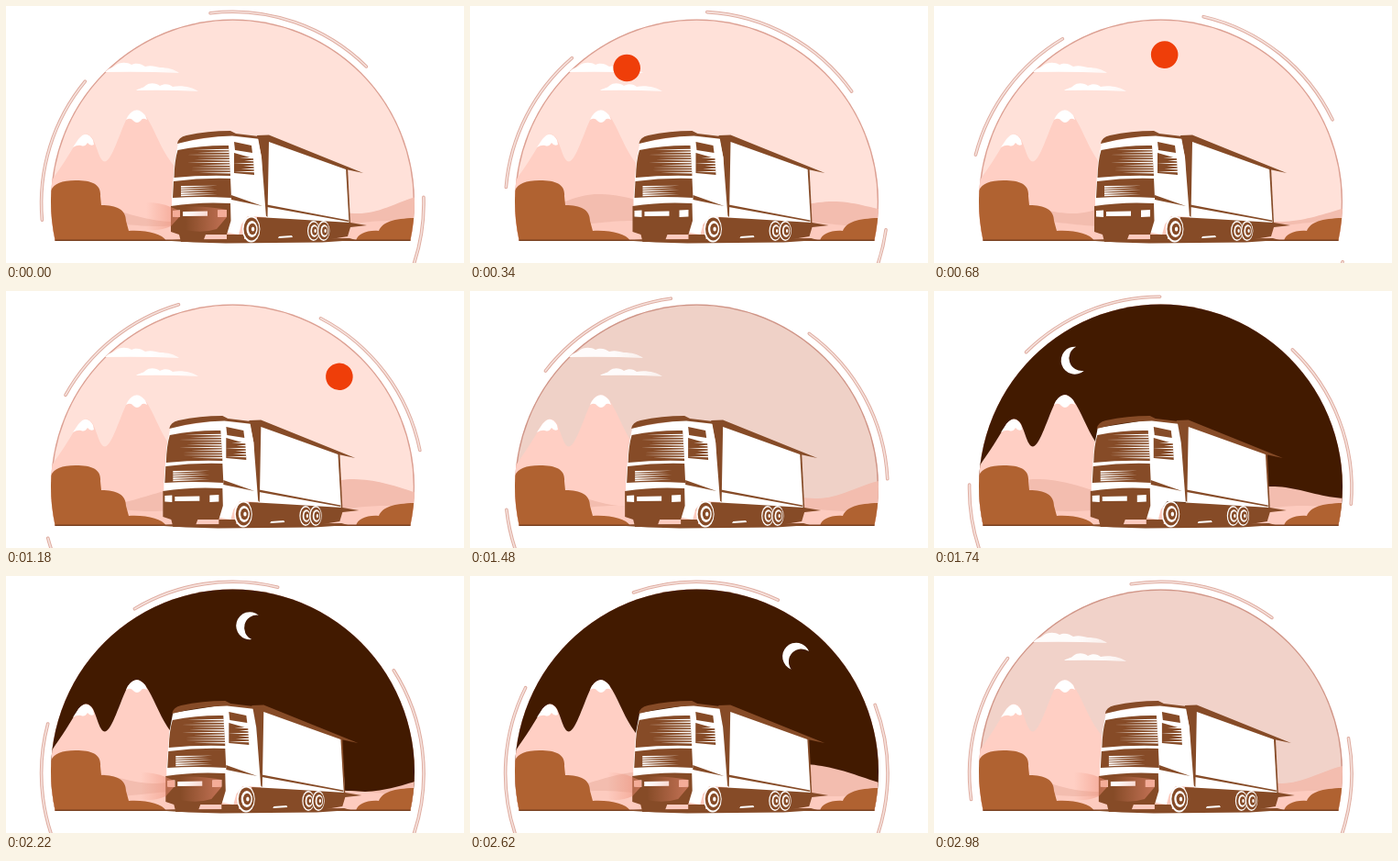
These frames come from a looping animation (500 by 280 pixels, 3 s). An HTML page:

```html
<!DOCTYPE html>
<html lang="en">
<head>
<meta charset="utf-8">
<title>Truck, day and night</title>
<style>
html, body { margin: 0; width: 100%; height: 100%; overflow: hidden; background: #fff; }
svg { display: block; width: 500px; height: 280px; }
.b { fill: #864b27; }
.w { fill: #fff; }
</style>
</head>
<body>
<svg viewBox="0 0 500 280">
  <defs>
    <clipPath id="dome"><path d="M53.7 256A198.5 198.5 0 1 1 441.3 256Z"/></clipPath>
    <linearGradient id="mist" x1="0" x2="1" y1="0" y2="0">
      <stop offset="0" stop-color="#fff"/>
      <stop offset=".6" stop-color="#fff"/>
      <stop offset="1" stop-color="#fff" stop-opacity=".7"/>
    </linearGradient>
    <linearGradient id="beam" x1="0" x2="1" y1="0" y2="0">
      <stop offset="0" stop-color="#ee8f78" stop-opacity="0"/>
      <stop offset="1" stop-color="#ec8b74" stop-opacity=".6"/>
    </linearGradient>
  </defs>

  <g id="ring" fill="none" stroke-linecap="round"></g>

  <g clip-path="url(#dome)">
    <rect width="500" height="280" fill="#ffe1d9"/>
    <circle cx="247.5" cy="213" r="198.5" fill="none" stroke="#dba093" stroke-width="2.6"/>
    <rect id="night" width="500" height="280" fill="#421a00"/>
    <g id="clouds" fill="url(#mist)">
      <path d="M108 72C112 67 116 68 119 65C124 61 132 61 137 64C143 61 149 64 152 66C158 64 164 66 168 67C176 67 184 69 189 73Q150 71 108 72Z"/>
      <path d="M142 92C146 89 149 90 152 87C157 83 164 84 168 87C173 84 179 85 182 88C191 86 203 88 210 93Q176 91 142 92Z"/>
    </g>
    <g id="sun"><circle cy="-195.5" r="14.8" fill="#ef3e09"/></g>
    <g id="moon">
      <path class="w" transform="translate(0 -195.5) rotate(10)" d="M6.1-13.75A15 15 0 1 0 6.1 13.75A13.9 13.9 0 0 1 6.1-13.75Z"/>
    </g>
    <path fill="#ffcfc4" d="M40 205L54 184C64 170 73 155 79 145Q88 134 95 145C100 155 102 169 108 169.500C116 168 124 138 133 120Q142 107 152 119C161 132 167 150 176 164C186 180 205 195 225 215V260H40Z"/>
    <path class="w" d="M73 154L79 145Q88 134 95 146L96 151Q92 153 89 149Q86 154 82 152Q78 151 73 154Z"/>
    <path class="w" d="M131 124L133 120Q142 107 152 119L154 124Q149 121 147 125Q143 129 139 125Q136 121 131 124Z"/>
    <path id="hill" fill="#f3bdaf"/>
    <path id="slope" fill="#fdcbbf"/>
    <path fill="#b06231" d="M46 256V210C49 196 55 190 76 190C95 190 104 195 103 207L104 217C121 217 131 222 131 234L134 245C154 244 170 248 175 256Z"/>
    <path fill="#b06231" d="M382 256C384 248 394 244 407 245C411 235 425 231 450 231V256Z"/>
    <rect x="50" y="254.500" width="396" height="1.500" fill="#7a4122"/>
  </g>

  <g id="truck">
    <path class="b" d="M173 255.5L190 254.500L375 253L382 255L345 257.5L240 258.5L205 257.5Z"/>
    <!-- trailer -->
    <path class="w" d="M284 142L372 177L376 238L284 232Z"/>
    <path class="b" d="M274 141L287 140.5L390 182L371 178L287 148L285.5 230L281 226L279 165Z"/>
    <path class="b" d="M371 176L373 176L376 236L374.500 236Z"/>
    <path class="b" d="M285 216.5L374 233.500V235L285 219Z"/>
    <path class="b" d="M274 230L310 232L376 236L394 239L376 241L373 251L355 254L322 256L274 255Z"/>
    <path class="w" d="M298 251L312 250L313 252L297 253Z"/>
    <!-- cab -->
    <path class="w" d="M188 149L246 140L275 143L279 165L284 230L264 229L257 238L254 249L243 247L181 240V210L184 170Z"/>
    <path class="b" d="M187 150Q188 143 197 141Q220 136 245 136L251 139L276 142L278 145L247 141.500Q215 142 187 150Z"/>
    <path class="b" d="M187.5 157Q215 151.5 243 152L245 185Q214 184 183.5 187Q184 168 187.5 157Z"/>
    <path class="b" d="M249 148L268 152L269 160L250 157Z"/>
    <path class="b" d="M249 160L270 166L271 184L249 182Z"/>
    <path class="b" d="M183 191Q214 187 245 188L246 209Q212 207 182 209Z"/>
    <path class="b" d="M246 206L280 218L246 211Z"/>
    <path class="b" d="M180 218Q212 213 245 215L245.500 234L241 249H218L215 257H191L189 249L180 246Z"/>
    <path class="b" d="M241 249H260V255H241Z"/>
    <path class="w" d="M182 223L190 222.5V230L182 229.5Z"/>
    <path class="w" d="M231 222.5L241 222V229.5L231 230Z"/>
    <path class="w" d="M193 224L220 223.5V228.7L193 229Z"/>
    <g id="streaks" class="w"></g>
    <g id="wheels"></g>
    <g id="lights" fill="url(#beam)">
      <path d="M189 223L189 230L180 240Q166 246 153 243V214Q168 214 180 219Z"/>
      <path d="M241 222V230L230 243Q214 248 196 244V219Q215 217 241 222Z"/>
      <path fill="#f4ac98" d="M182 223L190 222.5V230L182 229.5ZM231 222.5L241 222V229.5L231 230Z"/>
    </g>
  </g>
</svg>
<script>
const LOOP = 3000, HALF = LOOP / 2;
const $ = id => document.getElementById(id);
const set = (id, name, value) => $(id).setAttribute(name, value);
const clamp = v => Math.min(1, Math.max(0, v));
const ramp = (t, from, to) => clamp((t - from) / (to - from));

function add(parent, tag, attrs) {
  const el = document.createElementNS('http://www.w3.org/2000/svg', tag);
  for (const key in attrs) el.setAttribute(key, attrs[key]);
  $(parent).appendChild(el);
}

// Ring arcs, angles in degrees clockwise from the top
const RING = 208.7;
function ringPoint(deg) {
  const a = deg * Math.PI / 180;
  return `${RING * Math.sin(a)} ${-RING * Math.cos(a)}`;
}
for (const [from, to] of [[-6.7, 44.4], [88.1, 135], [-184, -139.2], [-95, -50.5]]) {
  const d = `M${ringPoint(from)}A${RING} ${RING} 0 0 1 ${ringPoint(to)}`;
  add('ring', 'path', { d, stroke: '#dfaca0', 'stroke-width': 3.6 });
  add('ring', 'path', { d, stroke: '#f6e2dd', 'stroke-width': 1.6 });
}

// Tapered white reflections: pointed at the left, cut at the right
function streaks(count, x, y, step, right, grow) {
  for (let i = 0; i < count; i++) {
    const top = y + i * step, left = x + 7 * Math.sin(i * 2.3);
    const end = right + grow * i;
    add('streaks', 'path', { d: `M${left} ${top}L${end} ${top - .7}V${top + .7}Z` });
  }
}
streaks(10, 204, 156.5, 2.8, 243.5, .15);
streaks(6, 255, 165.5, 3, 270.5, .1);
for (let i = 0; i < 5; i++) {
  const y = 196 + i * 2.4;
  add('streaks', 'path', { d: `M191 ${y}L${231 - 3 * (i % 2)} ${y - .2}L191 ${y + 1.7}Z` });
}

function wheel(x, y, rx, ry) {
  [[1.15, 'w'], [1, 'b'], [.72, 'w'], [.5, 'b'], [.2, 'w']].forEach(([k, kind]) =>
    add('wheels', 'ellipse', { cx: x + (1 - k) * 2, cy: y, rx: rx * k, ry: ry * k, class: kind }));
}
wheel(268, 243, 8.5, 12.5);
wheel(336, 245, 5.8, 9.5);
wheel(347, 245, 5.8, 9.5);

// Repeating ridge through crests and troughs [x, y], eased between them
function ridge(points, width, shift) {
  const ring = [...points, [points[0][0] + width, points[0][1]]];
  let d = 'M40 260';
  for (let x = 40; x <= 456; x += 4) {
    const first = ring[0][0];
    const u = first + (((x - shift - first) % width) + width) % width;
    const i = ring.findIndex((p, k) => k > 0 && u <= p[0]);
    const [x0, y0] = ring[i - 1], [x1, y1] = ring[i];
    const k = (1 - Math.cos(Math.PI * (u - x0) / (x1 - x0))) / 2;
    d += `L${x} ${(y0 + (y1 - y0) * k).toFixed(2)}`;
  }
  return d + 'L456 260Z';
}
const HILL = [[43, 205], [184, 235], [300, 213], [384, 226]];
const SLOPE = [[80, 234], [165, 240]];

// Sun and moon each cross the sky in half a loop
function orbit(id, t) {
  const on = t >= 0 && t < HALF;
  set(id, 'transform', `translate(245 248.5) rotate(${-46.4 + .071 * t})`);
  set(id, 'opacity', on ? ramp(t, 20, 170) * (1 - ramp(t, 1290, 1460)) : 0);
}

function draw(t) {
  const dark = ramp(t, 1460, 1710) * (1 - ramp(t, 2750, 3000));
  const shift = t / LOOP * 850;
  set('ring', 'transform', `translate(247.3 215) rotate(${t * .0289})`);
  set('night', 'opacity', dark);
  set('clouds', 'opacity', 1 - dark);
  orbit('sun', t);
  orbit('moon', t - 1480);
  set('hill', 'd', ridge(HILL, 425, shift));
  set('slope', 'd', ridge(SLOPE, 170, shift));
  set('truck', 'transform', `translate(${-11 * (1 - Math.abs(t - HALF) / HALF)} 0)`);
  set('lights', 'opacity', t < HALF ? 1 - ramp(t, 100, 250) : ramp(t, 1760, 1910));
}

const start = performance.now();
function tick() {
  draw((performance.now() - start) % LOOP);
  requestAnimationFrame(tick);
}
tick();
</script>
</body>
</html>
```
